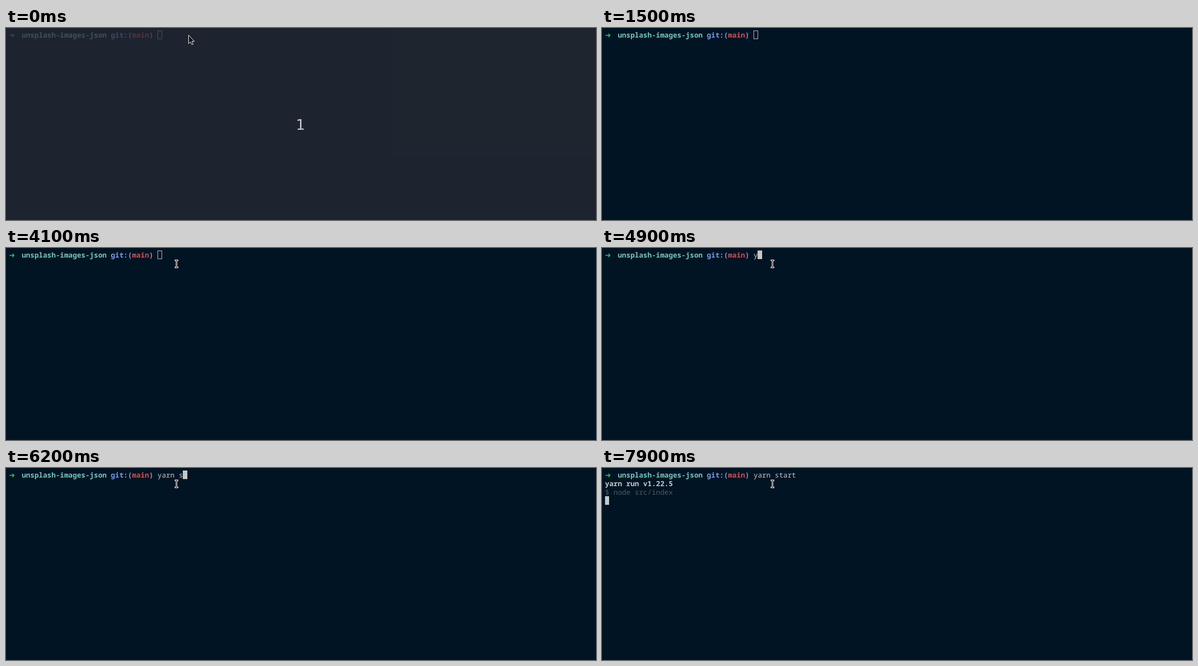
An HTML page for the animation above (8 s loop, 1168 by 381 pixels).

```html
<!DOCTYPE html>
<html lang="en">
<head>
<meta charset="utf-8">
<title>Terminal session</title>
<style>
  html, body { margin: 0; width: 100%; height: 100%; overflow: hidden; background: #001423; }
  svg { display: block; width: 1168px; height: 381px; }
  text {
    font: 14px "Noto Sans Mono", "DejaVu Sans Mono", monospace;
    white-space: pre;
    text-rendering: geometricPrecision;
    fill: #c5c8c6;
  }
  .bold { font-weight: 600; }
  .arrow { font-family: "DejaVu Sans", sans-serif; font-weight: 700; fill: #22c766; }
  .dir { fill: #73c8bb; }
  .git { fill: #789ce8; }
  .branch { fill: #da4d4b; }
  .dim { fill: #4f5a62; }
  .count { font: 29px "DejaVu Sans", sans-serif; fill: #c5c8cb; text-anchor: middle; }
  #caret { fill: #c5c8c6; }
  #hollow { fill: none; stroke: #c5c8c6; }
  #beam { shape-rendering: crispEdges; }
</style>
</head>
<body>
<svg viewBox="0 0 1168 381">
  <rect width="1168" height="381" fill="#001423"/>
  <rect y="380" width="1168" height="1" fill="#14152a"/>

  <text class="arrow" x="6" y="19">➜</text>
  <text class="bold dir" x="31.2" y="19">unsplash-images-json</text>
  <text class="bold git" x="207.6" y="19">git:(<tspan class="branch">main</tspan>)</text>
  <text id="typed" x="300" y="19"></text>
  <text id="version" class="bold" x="6" y="36">yarn run v1.22.5</text>
  <text id="script" class="dim" x="6" y="53">$ node src/index</text>

  <rect id="hollow" x="300.5" y="5.5" width="8" height="16"/>
  <rect id="caret" height="17"/>

  <g id="beam">
    <path fill="#fff" d="M-3.5-8.5h7v3h-2v11h2v3h-7v-3h2v-11h-2z"/>
    <path fill="#000" d="M-2.5-7.5h5v1h-2v13h2v1h-5v-1h2v-13h-2z"/>
  </g>

  <g id="countdown">
    <rect width="1168" height="381" fill="#292a33" fill-opacity=".75"/>
    <text class="count" x="583" y="202">1</text>
    <path d="M361.5 14V31L365.3 27.6L368 33L370.6 31.8L368 26.4H372.8Z" fill="#111" stroke="#fff" stroke-linejoin="round"/>
  </g>
</svg>
<script>
  const LOOP = 8000, CHAR = 8.4, LINE = 17, LEFT = 6, INPUT_COL = 35;
  const COMMAND = "yarn start";
  const KEY_TIMES = [4900, 5000, 5100, 5300, 5500, 6200, 6400, 6600, 6800, 6900];
  const LINE_TIMES = [7600, 7800, 7900];

  // Pointer stops: [time, x, y]; a stop without a place hides it.
  const POINTER = [
    [0], [100, 361.5, 14.5], [900, 374.5, 19.5], [1000],
    [3600, 294.5, 9.5], [3800, 274.5, 24.5], [3900, 284.5, 46.5],
    [4000, 316.5, 49.5], [4100, 337.5, 31.5]
  ];

  const $ = id => document.getElementById(id);
  const show = (id, on) => $(id).style.display = on ? "" : "none";
  const passed = (times, t) => times.filter(at => at <= t).length;

  function drawPointer(t) {
    const [, x, y] = POINTER.filter(stop => stop[0] <= t).pop();
    show("beam", x !== undefined);
    if (x !== undefined) $("beam").setAttribute("transform", `translate(${x} ${y})`);
  }

  function drawCaret(t, keys, row) {
    const focused = (t >= 500 && t < 1500) || t >= KEY_TIMES[0];
    const x = LEFT + (row ? 0 : INPUT_COL + keys) * CHAR;
    const start = Math.round(x);
    $("caret").setAttribute("x", start);
    $("caret").setAttribute("width", Math.round(x + CHAR) - start);
    $("caret").setAttribute("y", 5 + row * LINE);
    show("caret", focused);
    show("hollow", t < KEY_TIMES[0]);
  }

  function render(t) {
    const keys = passed(KEY_TIMES, t);
    const row = passed(LINE_TIMES, t);
    $("typed").textContent = COMMAND.slice(0, keys);
    show("version", row > 1);
    show("script", row > 2);
    drawCaret(t, keys, row);
    drawPointer(t);
    show("countdown", t < 100);
  }

  const begin = performance.now();
  function tick() {
    render((performance.now() - begin) % LOOP);
    requestAnimationFrame(tick);
  }
  tick();
</script>
</body>
</html>
```
